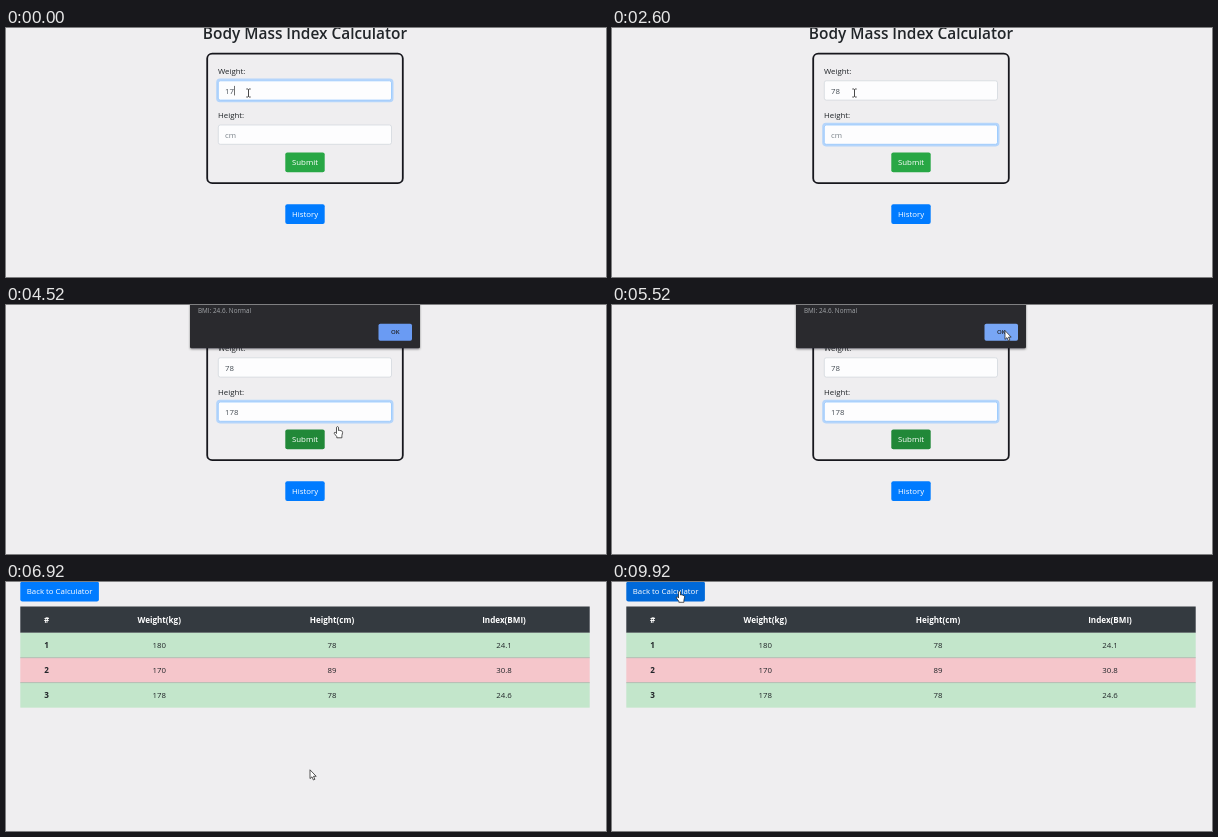
Write an HTML page that moves like this. It is 600 by 249 pixels and loops after 10 s.

```html
<!DOCTYPE html>
<html lang="en">
<head>
<meta charset="utf-8">
<title>Body Mass Index Calculator</title>
<style>
  html, body { margin: 0; width: 100%; height: 100%; overflow: hidden; background: #efeef0; }
  svg { display: block; width: 600px; height: 249px; }
  text { font: 7.85px "Open Sans", "Noto Sans", sans-serif; fill: #212529; }
  .mid { text-anchor: middle; }
  .title { font-size: 15.4px; font-weight: 600; }
  .bold { font-size: 8.1px; font-weight: 700; }
  .light { fill: #fff; }
  .field { fill: #fdfdfe; stroke: #ced4da; stroke-width: .7; }
  .ring { fill: none; stroke-width: 2; }
  .value { fill: #495057; }
  .value.empty { fill: #7b838a; }
  .note { font-size: 6.35px; fill: #a3a6aa; }
  .ok { font-size: 6px; font-weight: 600; fill: #202124; }
</style>
</head>
<body>
<svg id="stage" viewBox="0 0 600 249">
  <defs>
    <filter id="shadow" x="-10%" y="-20%" width="120%" height="150%">
      <feDropShadow dx="0" dy="1" stdDeviation="1.2" flood-opacity=".45"/>
    </filter>
  </defs>
  <rect width="600" height="249" fill="#efeef0"/>
  <g id="form"></g>
  <g id="history"></g>
  <g id="alert">
    <rect x="184" y="-6" width="230" height="49.3" rx="1.5" fill="#292a2d" filter="url(#shadow)"/>
    <text class="note" x="192" y="8.2">BMI: 24.6. Normal</text>
    <rect id="okBox" x="372.5" y="18.8" width="33.5" height="17" rx="1.8" fill="#6a9bf3"/>
    <text class="ok mid" x="389.2" y="29.4">OK</text>
  </g>
  <g id="cursor">
    <path id="beam" d="M-2.2-4H-.6L0-3.5 .6-4H2.2M0-3.5V3.5M-2.2 4H-.6L0 3.5 .6 4H2.2"
          fill="none" stroke="#333" stroke-width=".9"/>
    <path id="arrow" d="M0 0V8.8L2 7 3.4 10.2 4.9 9.5 3.5 6.5H6.2Z"
          fill="#fff" stroke="#222" stroke-width=".75" stroke-linejoin="round"/>
    <path id="hand" d="M-1 .8Q0-.6 1 .8V4L2.2 3.8 3.4 4.2 4.6 4.7Q5.2 5 5.1 6L4.4 9.2V11.3H-.7V10.2L-3.2 7Q-3.4 5.7-2.2 5.8L-1 7Z"
          fill="#fff" stroke="#222" stroke-width=".75" stroke-linejoin="round"/>
  </g>
</svg>
<script>
const LOOP = 10000;
const BLUE = "#007bff", BLUE_HOVER = "#0069d9", GREEN = "#28a745", GREEN_HOVER = "#218838";
const $ = id => document.getElementById(id);

function add(parent, tag, attrs, content) {
  const node = document.createElementNS("http://www.w3.org/2000/svg", tag);
  for (const key in attrs) node.setAttribute(key, attrs[key]);
  if (content) node.textContent = content;
  parent.append(node);
  return node;
}
const box = (parent, x, y, width, height, attrs) =>
  add(parent, "rect", { x, y, width, height, ...attrs });
const label = (parent, x, y, content, cls = "") =>
  add(parent, "text", { x, y, class: cls }, content);

function button(parent, x, y, width, fill, caption) {
  const face = box(parent, x, y, width, 19.8, { rx: 2, fill });
  label(parent, x + width / 2, y + 12.7, caption, "mid light");
  return face;
}

function field(y, caption, unit) {
  label(form, 212, y - 7, caption);
  const ring = box(form, 211.2, y - 1, 175.3, 21.6,
    { rx: 2.8, class: "ring", stroke: "#b5d5fb" });
  const face = box(form, 212.3, y + .2, 173.2, 19.3, { rx: 2, class: "field" });
  const value = label(form, 219, y + 13.2, unit, "value");
  const caret = box(form, 0, y + 5.3, .7, 9.5, { fill: "#333" });
  return { ring, face, value, caret, unit };
}

const form = $("form"), history_ = $("history");

label(form, 299, 11, "Body Mass Index Calculator", "title mid");
box(form, 201.2, 25.6, 195.6, 129.6, { rx: 5, fill: "none", stroke: "#17171d", "stroke-width": 1.8 });
const weight = field(52.6, "Weight:", "kg");
const height = field(96.8, "Height:", "cm");
const submitRing = box(form, 278.5, 123.7, 41, 21.2, { rx: 2.8, class: "ring", stroke: "#9fd5ab" });
const submit = button(form, 279.3, 124.5, 39.4, GREEN, "Submit");
const past = button(form, 279.3, 176.3, 39.4, BLUE, "History");

const back = button(history_, 14.3, -.4, 78.6, BLUE, "Back to Calculator");
const columns = [40.5, 153.2, 326, 498];
function row(y, h, fill, cells, cls) {
  box(history_, 14.3, y, 569.4, h, { fill });
  cells.forEach((cell, i) => label(history_, columns[i], y + h / 2 + 2.9, cell,
    "mid " + (cls || (i ? "" : "bold"))));
}
row(24.5, 26.3, "#343a40", ["#", "Weight(kg)", "Height(cm)", "Index(BMI)"], "bold light");
[["180", "78", "24.1"], ["170", "89", "30.8"], ["178", "78", "24.6"]].forEach((cells, i) => {
  const y = 50.8 + i * 24.95;
  row(y, 24.95, i === 1 ? "#f5c6cb" : "#c3e6cb", [String(i + 1), ...cells]);
  if (i) box(history_, 14.3, y - .4, 569.4, .8, { fill: "#a8b5ab" });
});

// [start time, value]
const weightText = [[0, "17"], [520, "1"], [720, ""], [1000, "7"], [1200, "78"]];
const heightText = [[0, ""], [2800, "1"], [3000, "17"], [3200, "178"]];
const focusSteps = [[0, "weight"], [2120, "height"], [5800, "submit"]];
// [time, x, y] of the pointer's hot spot
const path = [
  [0, 242.5, 65], [3400, 242.5, 65], [3920, 303, 132], [4320, 303, 132], [4520, 331.5, 121.5],
  [5120, 391, 26], [5920, 395, 25.2], [6000, 395, 25.2], [6450, 304, 186], [6720, 304, 187.8],
  [7320, 304, 187.8], [7720, 185, 142], [8200, 132.2, 66.3], [8800, 126, 62],
  [9520, 67.5, 9], [LOOP, 67.5, 9]
];

const at = (steps, t) => steps.filter(s => s[0] <= t).pop()[1];
const show = (node, on) => { node.style.display = on ? "" : "none"; };
const inside = (x, y, l, t, r, b) => x >= l && x <= r && y >= t && y <= b;

function pointer(t) {
  const i = path.findIndex(p => p[0] > t);
  const [t0, x0, y0] = path[i - 1], [t1, x1, y1] = path[i];
  const u = (t - t0) / (t1 - t0), k = u * u * (3 - 2 * u);
  return [x0 + (x1 - x0) * k, y0 + (y1 - y0) * k];
}

function drawField(f, content, focused, caretOn) {
  f.value.textContent = content || f.unit;
  f.value.classList.toggle("empty", !content);
  show(f.ring, focused);
  f.face.style.stroke = focused ? "#80bdff" : "";
  show(f.caret, focused && caretOn);
  f.caret.setAttribute("x", 219.3 + content.length * 4.48);
}

function draw(time) {
  const t = Math.floor(time / 200) * 200 + (time % 200 >= 120 ? 120 : 0);
  const onHistory = t >= 6720, alerting = t >= 4320 && t < 5800;
  const [x, y] = pointer(t);
  const focus = at(focusSteps, t);
  const overField = inside(x, y, 212, 52, 386, 73) || inside(x, y, 212, 96, 386, 117);
  const overSubmit = inside(x, y, 279, 124, 319, 145);
  const overPast = inside(x, y, 279, 176, 319, 197);
  const overBack = inside(x, y, 14, 0, 93, 19.5);

  show(form, !onHistory);
  show(history_, onHistory);
  show($("alert"), alerting);

  const caretOn = !alerting && t % 1000 < 500;
  drawField(weight, at(weightText, t), focus === "weight", caretOn);
  drawField(height, at(heightText, t), focus === "height", caretOn);
  show(submitRing, focus === "submit");
  submit.setAttribute("fill", alerting || overSubmit ? GREEN_HOVER : GREEN);
  past.setAttribute("fill", overPast ? BLUE_HOVER : BLUE);
  back.setAttribute("fill", overBack ? BLUE_HOVER : BLUE);
  $("okBox").setAttribute("fill", inside(x, y, 372, 18, 406, 36) ? "#78a6f5" : "#6a9bf3");

  let shape = "arrow";
  if (onHistory) shape = overBack ? "hand" : "arrow";
  else if (alerting) shape = y > 43 ? "hand" : "arrow";
  else if (overField) shape = "beam";
  else if (overSubmit || overPast) shape = "hand";
  for (const name of ["beam", "arrow", "hand"]) show($(name), name === shape);
  $("cursor").setAttribute("transform", `translate(${x} ${y})`);
}

const start = performance.now();
function tick() {
  draw((performance.now() - start) % LOOP);
  requestAnimationFrame(tick);
}
tick();
</script>
</body>
</html>
```
